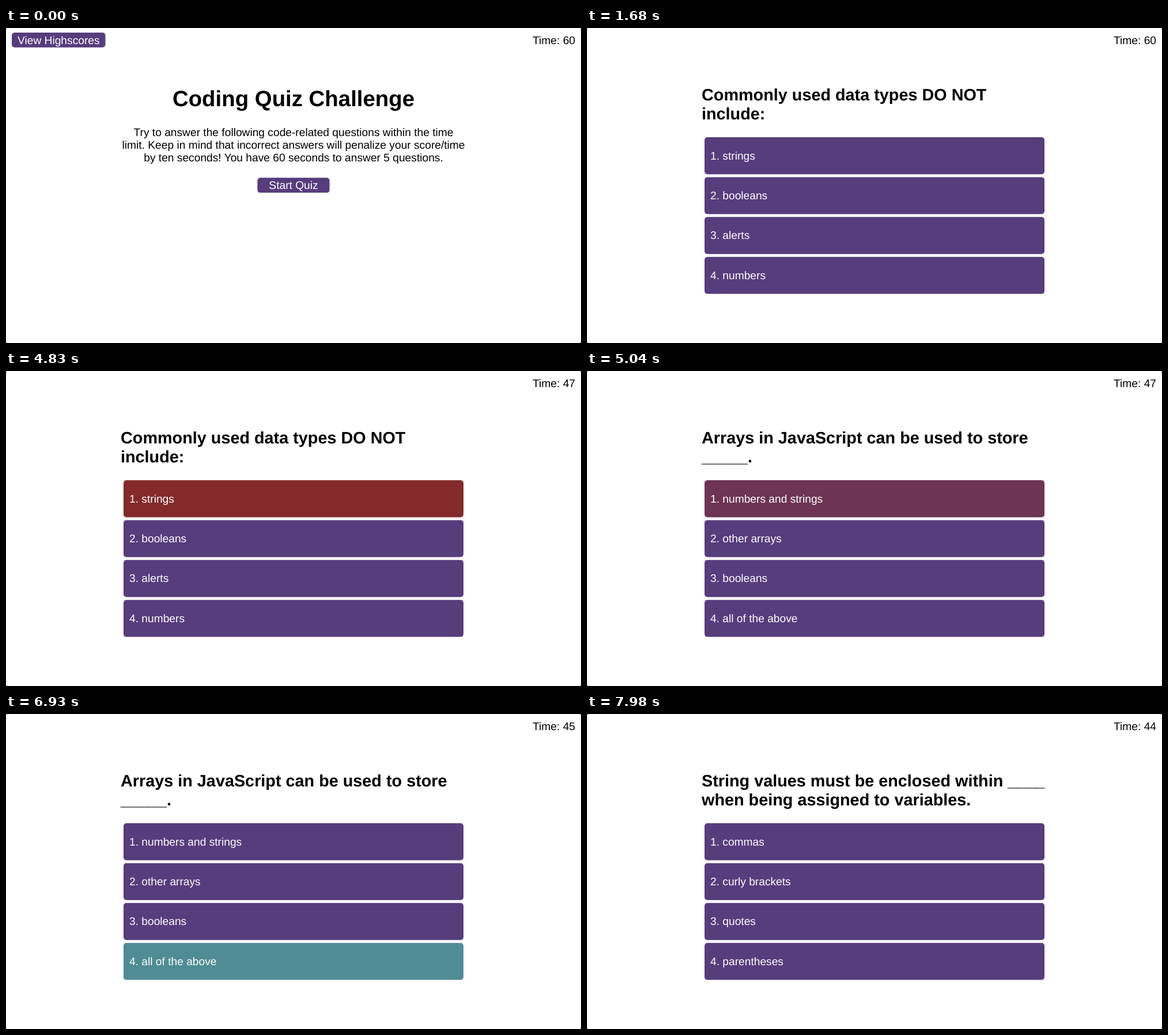
Write an HTML page with a canvas that moves like this. It is 998x548 px and loops after 8 s.

```html
<!DOCTYPE html>
<html lang="en">
<head>
<meta charset="utf-8">
<title>Coding Quiz</title>
<style>
  html, body { margin: 0; width: 998px; height: 548px; overflow: hidden; background: #fff; }
  canvas { display: block; }
</style>
</head>
<body>
<canvas id="stage" width="998" height="548"></canvas>
<script>
const ctx = document.getElementById('stage').getContext('2d');
const LOOP = 8000, STEP = 70;
const PURPLE = [86, 61, 124], HOVER = [120, 92, 160], RED = [132, 42, 42], TEAL = [80, 140, 148];

const questions = [
  { start: 1680, title: ['Commonly used data types DO NOT', 'include:'],
    choices: ['strings', 'booleans', 'alerts', 'numbers'] },
  { start: 5040, title: ['Arrays in JavaScript can be used to store', '_____.'],
    choices: ['numbers and strings', 'other arrays', 'booleans', 'all of the above'] },
  { start: 7350, title: ['String values must be enclosed within ____', 'when being assigned to variables.'],
    choices: ['commas', 'curly brackets', 'quotes', 'parentheses'] },
];
// A chosen button takes its verdict colour, then fades back with the next question.
const picks = [
  { choice: 0, color: RED, on: 3990, off: 5040, steps: 2 },
  { choice: 3, color: TEAL, on: 6300, off: 7350, steps: 3 },
];
const ticks = [[0, 60], [2730, 59], [3780, 58], [4830, 47], [5880, 46], [6930, 45], [7980, 44]];

// Share of a stepped fade that is complete at time t.
const fade = (t, start, steps) =>
  Math.max(0, Math.min(1, (Math.floor((t - start) / STEP) + 1) / steps));

const mix = (a, b, k) => `rgb(${a.map((v, i) => Math.round(v + (b[i] - v) * k)).join(',')})`;

function text(str, x, y, { size = 19.2, weight = 'normal', align = 'left', color = '#000' } = {}) {
  ctx.font = `${weight} ${size}px "Liberation Sans", Arial, sans-serif`;
  ctx.textRendering = 'geometricPrecision';
  ctx.textAlign = align;
  ctx.fillStyle = color;
  ctx.fillText(str, x, y);
}

function box(x, y, w, h, r, color) {
  ctx.fillStyle = color;
  ctx.beginPath();
  ctx.roundRect(x, y, w, h, r);
  ctx.fill();
}

function drawIntro(t) {
  box(10, 8, 162.5, 25.7, 5, mix(PURPLE, HOVER, 0));
  text('View Highscores', 20, 27.5, { color: '#fff' });
  text('Coding Quiz Challenge', 499, 135.5, { size: 38.4, weight: 'bold', align: 'center' });
  ['Try to answer the following code-related questions within the time',
   'limit. Keep in mind that incorrect answers will penalize your score/time',
   'by ten seconds! You have 60 seconds to answer 5 questions.',
  ].forEach((line, i) => text(line, 499, 187.5 + 22 * i, { align: 'center' }));
  box(436.4, 260.6, 125.2, 26, 5, mix(PURPLE, HOVER, fade(t, 1050, 2)));
  text('Start Quiz', 499, 280, { align: 'center', color: '#fff' });
}

function drawQuestion(t, { title, choices }) {
  title.forEach((line, i) => text(line, 199, 126 + 33 * i, { size: 28.8, weight: 'bold' }));
  choices.forEach((label, i) => {
    const y = 190 + 69.4 * i;
    const pick = picks.find(p => p.choice === i);
    const k = pick ? fade(t, pick.on, pick.steps) - fade(t, pick.off, pick.steps) : 0;
    box(204, y, 590, 64.4, 5, mix(PURPLE, pick ? pick.color : PURPLE, k));
    text(`${i + 1}. ${label}`, 214, y + 38.6, { color: '#fff' });
  });
}

function draw(now) {
  const t = now % LOOP;
  ctx.fillStyle = '#555';
  ctx.fillRect(0, 0, 998, 548);
  box(0, 0, 998, 548, 2.5, '#fff');
  const question = questions.findLast(q => t >= q.start);
  if (question) drawQuestion(t, question);
  else drawIntro(t);
  text(`Time: ${ticks.findLast(([at]) => t >= at)[1]}`, 988, 27.5, { align: 'right' });
  requestAnimationFrame(() => draw(performance.now()));
}
draw(0);
</script>
</body>
</html>
```
